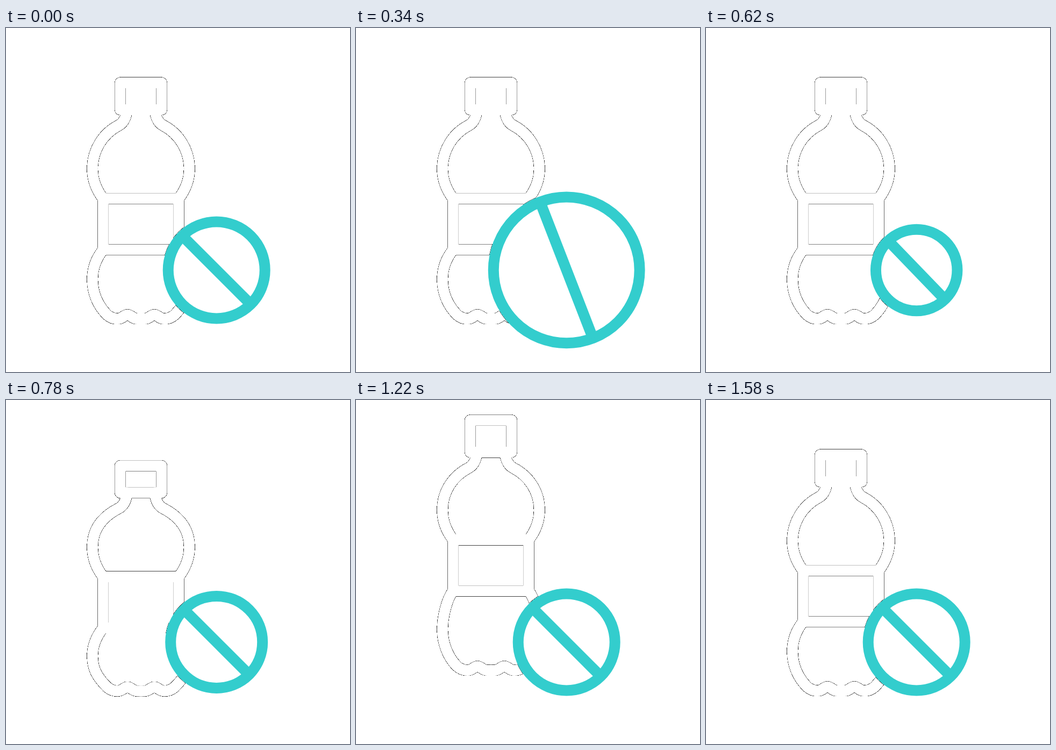
An HTML page for the animation above (1620 ms loop, 640 by 640 pixels).

```html
<!DOCTYPE html>
<html lang="en">
<head>
<meta charset="utf-8">
<title>No plastic bottles</title>
<style>
  html, body { margin: 0; width: 100%; height: 100%; overflow: hidden; background: #fff; }
  svg { display: block; width: 100%; height: 100%; }
  .bottle { fill: none; stroke: #fff; stroke-width: 20.2; stroke-linejoin: round; stroke-linecap: round; }
  .sign { fill: none; stroke: #33cdcd; stroke-width: 20; }
</style>
</head>
<body>
<svg viewBox="0 0 640 640">
  <defs>
    <!-- Black behind every touched pixel, so only half-covered edges show as hairlines. -->
    <filter id="fringe" filterUnits="userSpaceOnUse" x="0" y="0" width="640" height="640"
            color-interpolation-filters="sRGB">
      <feComponentTransfer in="SourceAlpha" result="black">
        <feFuncA type="linear" slope="20"/>
      </feComponentTransfer>
      <feMerge>
        <feMergeNode in="black"/>
        <feMergeNode in="SourceGraphic"/>
      </feMerge>
    </filter>
    <mask id="cut" maskUnits="userSpaceOnUse" x="0" y="0" width="640" height="640">
      <rect width="640" height="640" fill="#fff"/>
      <circle id="hole" cx="391.7" cy="450.4"/>
    </mask>
  </defs>
  <g filter="url(#fringe)">
    <g class="bottle" mask="url(#cut)">
      <path id="cap"/>
      <path id="label"/>
      <path id="side"/>
      <use href="#side" transform="matrix(-1 0 0 1 502 0)"/>
    </g>
  </g>
  <g class="sign" transform="translate(391.7 450.4)">
    <circle id="ring"/>
    <path id="bar"/>
  </g>
</svg>
<script>
const LOOP = 1620, STEP = 20;
const $ = id => document.getElementById(id);
const set = (id, name, value) => $(id).setAttribute(name, value);

// Eased value at time t along [time, value] keys.
function track(keys, t) {
  if (t <= keys[0][0]) return keys[0][1];
  for (let i = 1; i < keys.length; i++) {
    const [t0, a] = keys[i - 1], [t1, b] = keys[i];
    if (t < t1) {
      const p = (t - t0) / (t1 - t0);
      return a + (b - a) * p * p * (3 - 2 * p);
    }
  }
  return keys[keys.length - 1][1];
}

const RADIUS = [[12, 100], [335, 146], [640, 85], [860, 100]];
const ANGLE = [[10, 45], [390, 70], [652, 45]];

// Vertical offsets of each bottle part for the squashed and the stretched pose.
const PARTS = {
  top: [43, -80], neck: [43, -68.7], waist: [24.3, -70.4], low: [18, -50.5], base: [1, -46]
};

function offset([down, up], t) {
  return track([[640, 0], [930, down], [1145, up], [1431, down * 0.28], [1580, 0]], t);
}

function drawBottle(t) {
  const y = {};
  for (const part in PARTS) {
    const d = offset(PARTS[part], t);
    y[part] = v => (v + d).toFixed(2);
  }
  const { top, neck, waist, low, base } = y;

  set('cap', 'd', `M212.5 ${top(101.9)}H289.5V${neck(152)}H212.5Z`);
  set('label', 'd', `M180.7 ${waist(317.4)}H321.3V${waist(412.5)}H180.7Z`);
  set('side', 'd',
    `M224.5 ${neck(152)}C224.5 ${neck(167)} 217.5 ${neck(177)} 210 ${neck(181)}` +
    `C179.7 ${neck(196.4)} 160.8 ${waist(228)} 160.8 ${waist(262)}` +
    `C160.8 ${waist(282)} 168.5 ${waist(301.5)} 180.7 ${waist(317.4)}` +
    `M180.7 ${waist(412.5)}C168 ${waist(428.2)} 160.8 ${low(447.6)} 160.8 ${low(468)}` +
    `C160.8 ${low(492.2)} 170.4 ${base(515.7)} 187.5 ${base(533)}` +
    `C194 ${base(539)} 201 ${base(541)} 208 ${base(541)}` +
    `C217 ${base(541)} 219 ${base(533.7)} 226 ${base(533.7)}` +
    `C233 ${base(533.7)} 235 ${base(541)} 244 ${base(541)}H252`);
}

function drawSign(t) {
  const r = track(RADIUS, t), mid = r - 10;
  set('ring', 'r', mid);
  set('bar', 'd', `M${-mid} 0H${mid}`);
  set('bar', 'transform', `rotate(${track(ANGLE, t)})`);
  set('hole', 'r', r + 0.5);
}

function frame(now) {
  const t = Math.floor((now % LOOP) / STEP) * STEP;
  drawBottle(t);
  drawSign(t);
  requestAnimationFrame(frame);
}
frame(0);
</script>
</body>
</html>
```
